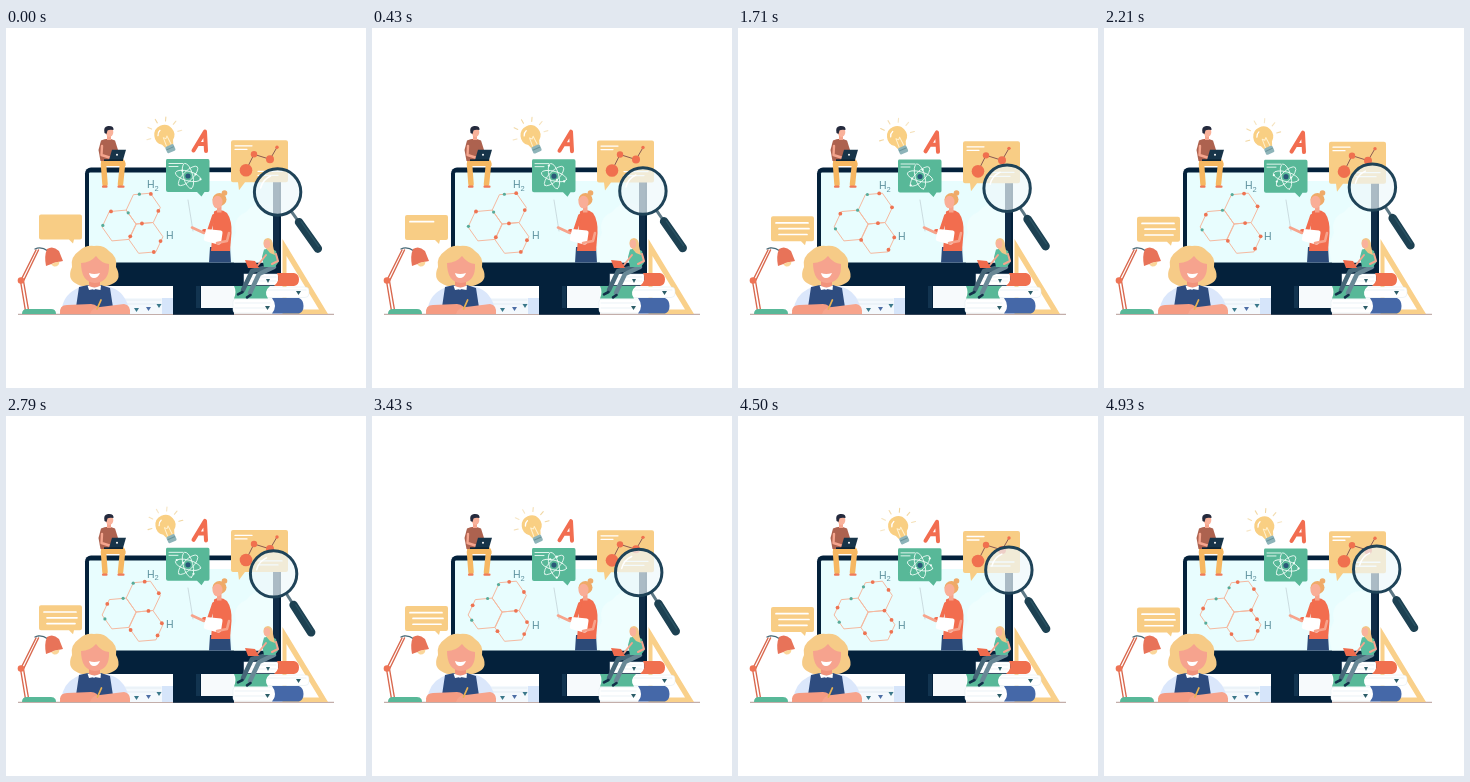
Recreate the animation shown at these times as an HTML page. Size 360 by 360 pixels, loop 5000 ms.

```html
<!DOCTYPE html>
<html lang="en">
<head>
<meta charset="utf-8">
<title>Online learning</title>
<style>
html,body{margin:0;width:100%;height:100%;overflow:hidden;background:#fff}
svg{display:block;width:100vw;height:100vh}
text{font-family:"Liberation Sans",Arial,sans-serif}
.line{fill:none;stroke-linecap:round;stroke-linejoin:round}
</style>
</head>
<body>
<svg viewBox="0 0 360 360">
  <path d="M12 286.300H328" stroke="#b59a95" stroke-width="1"/>

  <!-- monitor -->
  <rect x="79" y="139.600" width="196" height="118.400" rx="6" fill="#04213b"/>
  <rect x="83" y="144.400" width="184" height="90" rx="1" fill="#e8fdfe"/>
  <path d="M228 234.400Q222 218 230 205Q226 190 240 184Q252 170 267 178V234.400Z" fill="#effefe"/>
  <rect x="203" y="144.400" width="22" height="8.600" fill="#fff"/>
  <rect x="267" y="153" width="6" height="81" fill="#0f2c47"/>
  <rect x="195" y="258" width="33" height="22" fill="#f7fafc"/>
  <path d="M167 258H195V280H228V286.800H167Z" fill="#04213b"/>
  <rect x="190" y="258" width="4" height="22" fill="#123450"/>

  <!-- molecule -->
  <path id="bonds" class="line" stroke="#f5b9a0" stroke-width="1"/>
  <g id="atoms"></g>
  <g id="labels" fill="#5e929f" font-size="10.500">
    <text x="141" y="160">H</text><text x="148.500" y="162.500" font-size="7.500">2</text>
    <text x="160" y="210.500">H</text>
  </g>

  <!-- teacher -->
  <path class="line" d="M182 172L187 203" stroke="#c3d3d8" stroke-width=".8"/>
  <path d="M204 219H224L225 234.400H203Z" fill="#2c4a78"/>
  <path d="M208 183.500Q215 180 221 185Q226 192 225.500 205L224 223H205Z" fill="#f26d4f"/>
  <path class="line" d="M208 188L203 203L198 203" stroke="#f26d4f" stroke-width="4"/>
  <path class="line" d="M198 205L186 199.500" stroke="#f7a38b" stroke-width="2.600"/>
  <path d="M200 201L215 202.500Q217 203 216.500 205L215 215Q214 217 212 216.500L199 213Q197 212 198 210Z" fill="#fff"/>
  <path class="line" d="M223 205L221 213L211 215" stroke="#f7a38b" stroke-width="2.600"/>
  <rect x="211" y="176" width="4.500" height="8.500" fill="#f7a38b"/>
  <circle cx="218.500" cy="165" r="2.800" fill="#efaa68"/>
  <ellipse cx="213.500" cy="171.500" rx="7" ry="6.500" fill="#efaa68"/>
  <ellipse cx="211.500" cy="174" rx="5" ry="6.300" fill="#f9ae97"/>

  <!-- man with laptop -->
  <path d="M95 131H117Q120 133 119.500 138H95Z" fill="#f6b761"/>
  <path class="line" d="M116.500 136L114.500 156M97.500 136L99 156" stroke="#f6b761" stroke-width="5.500"/>
  <path class="line" d="M97 158.700H100.500M112.500 158.700H117.500" stroke="#ef7a5a" stroke-width="2.200"/>
  <path d="M95 112.500Q102 109 109 112.500L112 122L109 133H94.500L92.500 122Z" fill="#ad624f"/>
  <path class="line" d="M96 118L95.500 127L105 130" stroke="#f5a58e" stroke-width="2.400"/>
  <rect x="101" y="106" width="4" height="6" fill="#f5a58e"/>
  <ellipse cx="103.500" cy="104" rx="3.800" ry="5" fill="#f9b29b"/>
  <path d="M98.500 105Q97 98.500 102 98Q108 97.500 107.500 102Q103 101.500 101.500 102.500L100.500 106Z" fill="#242a3d"/>
  <path d="M106 121.700H120L117 132H103Z" fill="#173449"/>
  <path d="M98 131.300H117V133H98Z" fill="#0c2436"/>
  <circle cx="111" cy="126.700" r="1" fill="#fff"/>

  <!-- bulb -->
  <g id="bulb">
    <g id="rays" class="line" stroke="#f1d6a0" stroke-width="1.100"></g>
    <g transform="rotate(-24)">
      <path d="M0-10A10 10 0 0 1 6 8L4.500 12H-4.500L-6 8A10 10 0 0 1 0-10Z" fill="#f9cf83"/>
      <path class="line" d="M-2.500 11L-2 2L0 4L2 2L2.500 11" stroke="#fff1cf" stroke-width="1"/>
      <path class="line" d="M-6-2A6 6 0 0 1-2-6" stroke="#fff" stroke-width="1.300"/>
      <rect x="-4.500" y="11.500" width="9" height="7" rx="1.500" fill="#8eb4b9"/>
      <path d="M-4 14.500H4" stroke="#6a959d"/>
    </g>
  </g>

  <g id="letter">
    <path class="line" d="M187.500 122.500L199 103.500L200 123M192 116H199.500" stroke="#f26d50" stroke-width="4"/>
  </g>

  <!-- atom board -->
  <g id="board">
    <path d="M161 131H202Q203.500 131 203.500 133V162Q203.500 164 202 164H198.500L195.500 168.500L191 164H162Q160 164 160 162V133Q160 131 161 131Z" fill="#58b898"/>
    <path class="line" d="M163 135.500H177M163 138.500H172" stroke="#dff5ec" stroke-width="1"/>
    <g id="orbits" class="line" stroke="#e4f7f0" stroke-width=".9"></g>
    <circle cx="182" cy="148" r="2.600" fill="#2b5878"/>
  </g>

  <!-- graph bubble -->
  <g id="graph">
    <path d="M227 112H280Q282 112 282 114V152Q282 154 280 154H239L233 162L232 154H227Q225 154 225 152V114Q225 112 227 112Z" fill="#f8cd85"/>
    <path class="line" d="M229 117.500H246M229 121H241" stroke="#fff" stroke-width="1.300"/>
    <path class="line" d="M240 142L248 126L264 131L271 119" stroke="#8a5a52" stroke-width="1"/>
    <g fill="#f0704f"><circle cx="240" cy="142" r="6.300"/><circle cx="248" cy="126" r="3.200"/><circle cx="264" cy="131" r="4"/><circle cx="271" cy="119" r="1.700"/></g>
    <path class="line" d="M252 143H276M252 147H272" stroke="#fff" stroke-width="1.300"/>
  </g>

  <!-- chat bubble -->
  <g id="chat">
    <path d="M35 186.500H74Q76 186.500 76 188.500V209.500Q76 211.500 74 211.500H68L67 215.500L63 211.500H35Q33 211.500 33 209.500V188.500Q33 186.500 35 186.500Z" fill="#f8cd85"/>
    <g id="words" class="line" stroke="#fff" stroke-width="1.700"></g>
  </g>

  <!-- ruler -->
  <path d="M276.500 211L322 286H276.500ZM280.500 228V281.500H313Z" fill="#f9d08a" fill-rule="evenodd"/>

  <!-- books -->
  <g stroke="#dce8ee" stroke-width=".5" fill="#fff">
    <rect x="238" y="246" width="34" height="11"/>
    <rect x="256" y="259" width="47" height="10.500" rx="4"/>
    <rect x="227" y="271" width="46" height="14" rx="3"/>
  </g>
  <path d="M271 245H288Q293 246 293 251.500Q293 257 288 258H268Q275 252 271 245Z" fill="#f0704f"/>
  <path d="M228 258H264Q257 264 262 270.500H228Q231 264 228 258Z" fill="#58b898"/>
  <path d="M266 270H293Q297.500 272 297.500 278Q297.500 284 293 285.500H266Q272 278 266 270Z" fill="#4568a8"/>
  <path class="line" d="M240 249H270M240 253H270M262 262H300M229 275H264M229 280H264" stroke="#e2edf2" stroke-width=".7"/>
  <path d="M260 251H264L262 255ZM290 263H295L292.500 267ZM259 278H264L261.500 282Z" fill="#2c5d68"/>

  <!-- seated reader -->
  <path class="line" d="M266 238L246 243L237 262" stroke="#466778" stroke-width="4.500"/>
  <path class="line" d="M268 239L253 246L244 265" stroke="#688896" stroke-width="4.500"/>
  <path class="line" d="M232 266.300L236.500 264M241 269.300L244.500 267" stroke="#123049" stroke-width="2.600"/>
  <path d="M258 221.500Q265 219.500 270 223L272.500 234L269 239H258L256 229Z" fill="#59bd9f"/>
  <path class="line" d="M270 226L272 233L266 236M260 227L252 237" stroke="#f5a58e" stroke-width="2"/>
  <path d="M239 232L249 233L253 240H242Z" fill="#ef6b4d"/>
  <path d="M258 218Q256 210.500 262 210Q267 210.500 267 218L269 227L264 225Z" fill="#f2c587"/>
  <ellipse cx="261" cy="216" rx="3.200" ry="4.300" fill="#f9b29b"/>

  <!-- paper stack -->
  <rect x="116" y="270" width="51" height="16" fill="#f4f9fd"/>
  <rect x="156" y="270" width="11" height="16" fill="#d6e5fa"/>
  <path class="line" d="M118 272H155M118 276H155" stroke="#dce7ee" stroke-width=".7"/>
  <path d="M128 280H133L130.500 284ZM150.500 276H155.500L153 280Z" fill="#3a788a"/>
  <path d="M140 279H145L142.500 283Z" fill="#4d6ea5"/>

  <!-- lamp -->
  <path class="line" d="M19.500 283L14.500 253L30 222M22.500 282L17.500 253L32.500 222" stroke="#d9684e" stroke-width="1.400"/>
  <circle cx="15" cy="252.500" r="3.300" fill="#ee7355"/>
  <path class="line" d="M29 221Q35 218 42 223" stroke="#476a78" stroke-width="1.300"/>
  <path d="M41 221Q47 217 53 223L57 233Q49 234 40 238Q38 228 41 221Z" fill="#e87359"/>
  <path d="M45 236.500Q49 234 53.500 233.500Q53 239 48 238.500Z" fill="#fbd69a"/>
  <path d="M16 286Q16 281 21 281H45Q50 281 50 286Z" fill="#58b898"/>

  <!-- pupil -->
  <path d="M55 286Q56 268 70 261Q80 256 88 256Q98 256 109 261Q121 267 124 286Z" fill="#dbe7fb"/>
  <path d="M88 218Q98 217 103 223Q112 229 110 239Q116 250 108 255Q100 260 88 258Q76 260 69 255Q61 250 66 239Q64 229 73 223Q79 217 88 218Z" fill="#f6cb87"/>
  <path d="M73 259L82 257L88 262L95 257L104 260L108 286H69Z" fill="#2e4c7f"/>
  <rect x="83" y="250" width="11" height="9.500" fill="#f1937c"/>
  <path d="M81.500 257.500L88.500 260L95 257.500L94.500 262L88.500 261L83 262Z" fill="#fff"/>
  <path d="M75 235Q84 235 90 228Q95 235 103 236Q104 254 89 255Q75 254 75 235Z" fill="#f6a38e"/>
  <path d="M83 245Q88 247 94 245Q92 250 88 250Q84 250 83 245Z" fill="#fff"/>
  <path d="M54 286Q53 277 61 277L85 276Q93 276 94 286Z" fill="#f59b82"/>
  <path d="M84 286Q86 279 94 279L118 276Q125 277 124 286Z" fill="#f7a48c"/>
  <path id="pencil" class="line" d="M91 281L95 272" stroke="#e7b254" stroke-width="1.800"/>

  <!-- magnifier -->
  <g id="glass">
    <circle r="22.500" fill="#eef8fb" fill-opacity=".7"/>
    <g id="handle">
      <path d="M24 0H35" stroke="#5d7885" stroke-width="3"/>
      <path class="line" d="M37 0H69.500" stroke="#1d4152" stroke-width="8.500"/>
      <path class="line" d="M38-2H68" stroke="#2a5363" stroke-width="1.300"/>
    </g>
    <circle r="23.200" fill="none" stroke="#1f4358" stroke-width="3"/>
    <path class="line" d="M-17-4A17.500 17.500 0 0 1-7-16" stroke="#fff" stroke-width="1.500"/>
  </g>
</svg>
<script>
const LOOP = 5000, BOND = 17, CORAL = '#ee7352', TEAL = '#57ab99';
const $ = id => document.getElementById(id);
const rad = deg => deg * Math.PI / 180;
const clamp = v => Math.max(0, Math.min(1, v));

function add(parent, tag, attrs) {
  const el = document.createElementNS('http://www.w3.org/2000/svg', tag);
  for (const k in attrs) el.setAttribute(k, attrs[k]);
  return parent.appendChild(el);
}
function move(id, x, y) {
  $(id).setAttribute('transform', `translate(${x} ${y})`);
}
// Piecewise linear value through [time, value] pairs.
function track(keys, t) {
  let i = 1;
  while (i < keys.length - 1 && t > keys[i][0]) i++;
  const [t0, a] = keys[i - 1], [t1, b] = keys[i];
  return a + (b - a) * (t - t0) / (t1 - t0);
}

// Three hexagons that share one corner.
const rings = [-65, 175, 55].map(a => [130 + BOND * Math.cos(rad(a)), 196 + BOND * Math.sin(rad(a))]);
function corner(ring, k) {
  const a = rad(-5 - 60 * k);
  return [rings[ring][0] + BOND * Math.cos(a), rings[ring][1] + BOND * Math.sin(a)];
}
function along(ring, u) {
  const k = Math.floor(u), f = u - k, a = corner(ring, k), b = corner(ring, k + 1);
  return [a[0] + (b[0] - a[0]) * f, a[1] + (b[1] - a[1]) * f];
}
$('bonds').setAttribute('d', rings.map((_, r) =>
  'M' + [0, 1, 2, 3, 4, 5].map(k => corner(r, k).map(v => v.toFixed(1)).join(' ')).join('L') + 'Z').join(''));

const atoms = [
  [0, .95, CORAL], [0, 1.65, TEAL], [0, 5.75, CORAL], [0, 4.35, CORAL],
  [1, .8, TEAL], [1, 1.9, CORAL], [1, 2.9, TEAL],
  [2, 2.8, CORAL], [2, 4.9, CORAL], [2, 5.7, CORAL]
].map(([ring, u, color]) => ({
  ring, u, el: add($('atoms'), 'circle', {r: color === CORAL ? 1.9 : 1.6, fill: color})
}));

const rays = [-155, -120, -85, -50, -15, 165].map(a => {
  const c = Math.cos(rad(a)), s = Math.sin(rad(a));
  return add($('rays'), 'path', {d: `M${c * 14} ${s * 14}L${c * 18} ${s * 18}`});
});

const orbits = [0, 60, 120].map(a => ({
  a: a + 15,
  el: add($('orbits'), 'ellipse', {cx: 182, cy: 148, rx: 13, ry: 4.8, transform: `rotate(${a + 15} 182 148)`})
}));
const electrons = orbits.map(() => add($('orbits'), 'circle', {r: 1.1, fill: '#f4fffb', stroke: 'none'}));

const words = [[38, 70, 193.2, 100], [41, 71, 199, 700], [41, 69, 204.8, 1250]].map(([x, end, y, start]) => ({
  x, end, y, start, el: add($('words'), 'path', {})
}));

const glassX = [[0, 271.6], [930, 270.1], [1710, 269.1], [3430, 266.7], [4140, 269.3], [5000, 273]];
const glassTurn = [[0, 54.6], [1710, 56.4], [3430, 57.8], [5000, 57.5]];

function draw(t) {
  const p = t / LOOP;
  move('labels', 0, 3 * p);
  for (const d of atoms) {
    const [x, y] = along(d.ring, d.u + .69 * p);
    d.el.setAttribute('cx', x);
    d.el.setAttribute('cy', y);
  }
  move('bulb', 158.3 + 2 * p, 107 + 3.5 * p);
  rays.forEach((el, i) => el.setAttribute('opacity', .8 + .2 * Math.sin(2 * Math.PI * p + i)));
  move('letter', 0, 2.5 * p);
  move('board', 0, 1.5 * p);
  orbits.forEach((o, i) => {
    const a = rad(o.a), s = 2 * Math.PI * p + i * 2.1;
    const x = 13 * Math.cos(s), y = 4.8 * Math.sin(s);
    electrons[i].setAttribute('cx', 182 + x * Math.cos(a) - y * Math.sin(a));
    electrons[i].setAttribute('cy', 148 + x * Math.sin(a) + y * Math.cos(a));
  });
  move('graph', 0, .3 + 3 * p);
  move('chat', 0, 5 * p);
  for (const w of words) {
    const f = clamp((t - w.start) / 450);
    w.el.setAttribute('d', f ? `M${w.x} ${w.y}H${w.x + (w.end - w.x) * f}` : '');
  }
  move('pencil', .7 * Math.sin(4 * Math.PI * p), 0);
  move('glass', track(glassX, t), 164 - 11 * p);
  $('handle').setAttribute('transform', `rotate(${track(glassTurn, t)})`);
}

const begin = performance.now();
function tick() {
  draw((performance.now() - begin) % LOOP);
  requestAnimationFrame(tick);
}
draw(0);
requestAnimationFrame(tick);
</script>
</body>
</html>
```
